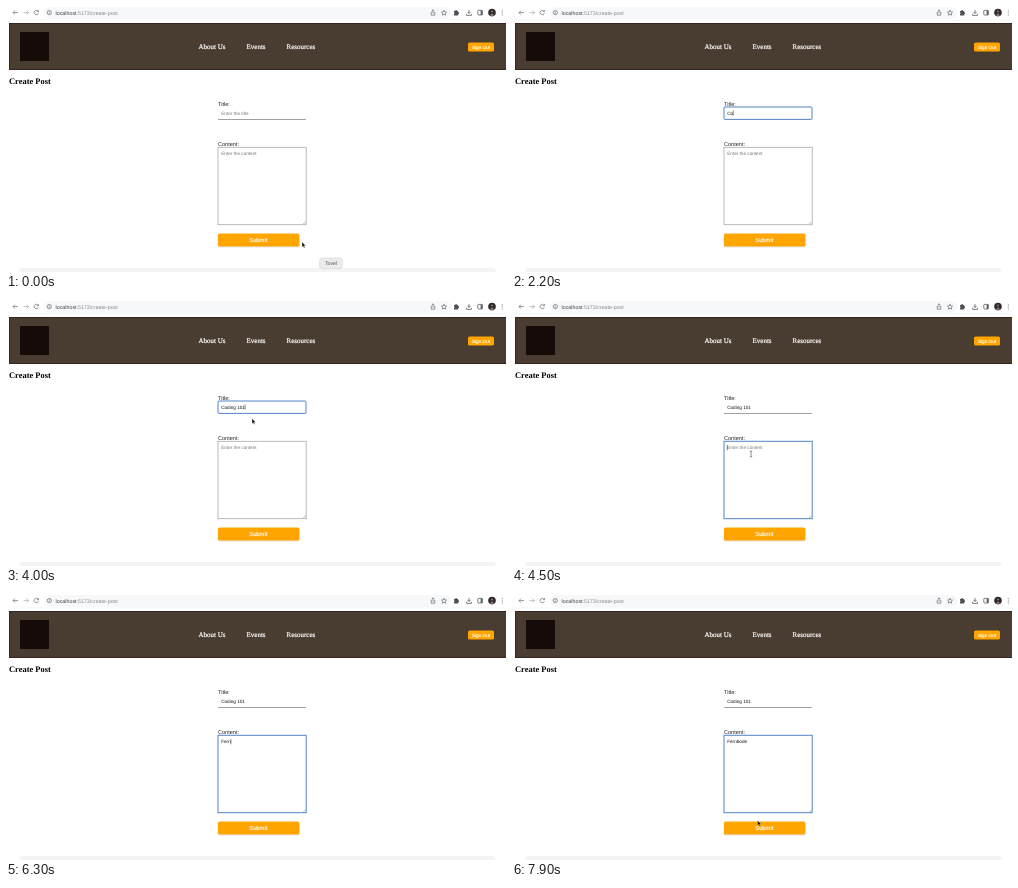
These frames come from a looping animation (500x266 px, 8000 ms). An HTML page:

```html
<!DOCTYPE html>
<html lang="en">
<head>
<meta charset="utf-8">
<title>Create Post</title>
<style>
  html, body { margin: 0; width: 100%; height: 100%; overflow: hidden; background: #fff; }
  svg { display: block; width: 500px; height: 266px; }
  text { font-family: "Liberation Sans", Arial, sans-serif; text-rendering: geometricPrecision; white-space: pre; }
  .serif { font-family: "Liberation Serif", Times, serif; }
  .nav { font-size: 7px; fill: #fff; stroke: #fff; stroke-width: .2; }
  .label { font-size: 5.55px; fill: #222; }
  .value { font-size: 4.65px; }
  .icon { fill: none; stroke: #73777b; stroke-width: .75; }
  .button { fill: #ffa500; }
  .caption { fill: #fff; stroke: #fff; stroke-width: .15; text-anchor: middle; }
</style>
</head>
<body>
<svg viewBox="0 0 500 266">
  <g id="toolbar">
    <rect x="38" y="1" width="407" height="12" rx="6" fill="#f7f8f9"/>
    <path class="icon" d="M12 6.6H7M9 4.6L7 6.6L9 8.6"/>
    <path class="icon" stroke-opacity=".6" d="M17.5 6.6H22.5M20.5 4.6L22.5 6.6L20.5 8.6"/>
    <path class="icon" d="M32 5.2A2.2 2.2 0 1 0 32.4 7.2M32.5 4V5.6H30.9"/>
    <g class="icon">
      <circle cx="43.3" cy="6.6" r="2.1"/><path d="M43.3 6.3V7.9M43.3 5.1V5.7"/>
      <path d="M425.8 6H425.2V9.2H428.8V6H428.2M427 7.6V3.8M425.9 4.9L427 3.8L428.1 4.9"/>
      <path d="M438 4.2L438.8 6L440.6 6.1L439.2 7.3L439.7 9.2L438 8.2L436.3 9.2L436.8 7.3L435.4 6.1L437.2 6Z"/>
    </g>
    <g class="icon" style="stroke: #55595d">
      <path d="M463 3.9V7.4M461.4 5.9L463 7.5L464.6 5.9M460.6 7.8V9.4H465.4V7.8"/>
      <rect x="471.8" y="4.4" width="4.6" height="4.6" rx=".6"/>
    </g>
    <path d="M448 5H449.2A.9.9 0 0 1 451 5H452.2V6.3A.9.9 0 0 1 452.2 8.1V9.4H448V7.9A.8.8 0 0 0 448 6.4Z" fill="#4d5156"/>
    <path d="M474.6 4.4H476.4V9H474.6Z" fill="#5f6368"/>
    <circle cx="486" cy="6.6" r="3.8" fill="#302a2c"/>
    <circle cx="486" cy="5.6" r="1" fill="#8b756e"/>
    <path d="M484 9.2Q486 5.6 488 9.2Q486 10.8 484 9.2" fill="#8b756e"/>
    <path d="M496.3 4.2V9.6" stroke="#73777b" stroke-width=".9" stroke-dasharray="1.1"/>
    <text x="49.6" y="8.5" font-size="5.3" fill="#3c4043">localhost<tspan fill="#85898d">:5173/create-post</tspan></text>
    <path d="M0 14H500" stroke="#f0f0f0" stroke-width=".6"/>
  </g>

  <rect x="3.5" y="17.5" width="498" height="46" fill="#493c30" stroke="#38241f"/>
  <rect x="14" y="26" width="29" height="29" fill="#150c0a"/>
  <text class="serif nav" x="192.5" y="43">About Us</text>
  <text class="serif nav" x="240.5" y="43">Events</text>
  <text class="serif nav" x="280.5" y="43">Resources</text>
  <rect class="button" x="462" y="36.5" width="26" height="9" rx="1.6"/>
  <text class="caption" x="475" y="42.6" font-size="4.65">Sign Out</text>

  <text class="serif" x="3" y="78.1" font-size="8.45" font-weight="700">Create Post</text>

  <text class="label" x="212" y="99.6">Title:</text>
  <path id="titleLine" d="M212 113.5H300" stroke="#888" stroke-width=".8"/>
  <rect id="titleRing" x="212" y="101" width="88" height="12.4" rx=".8" fill="none" stroke="#5582c6"/>
  <text id="titleText" class="value" x="215.2" y="108.9"></text>

  <text class="label" x="212" y="139.6">Content:</text>
  <rect id="contentBox" x="212" y="141.3" width="88.2" height="77.4" fill="none"/>
  <path d="M297 218L299.6 215.4M298.6 218L299.6 217" stroke="#999" stroke-width=".5"/>
  <text id="contentText" class="value" x="215.2" y="149.4"></text>

  <rect x="211.6" y="228" width="82.2" height="13.6" rx="2" fill="#000" opacity=".1"/>
  <rect class="button" x="212" y="227.5" width="81.3" height="13" rx="1.6"/>
  <text class="caption" x="252.3" y="236" font-size="5.8">Submit</text>

  <rect x="13" y="262" width="477" height="12" rx="4" fill="#f4f4f4"/>
  <g id="tooltip">
    <rect x="313.7" y="252" width="22.6" height="10.6" rx="2.6" fill="#ececec" stroke="#d2d2d2" stroke-width=".6"/>
    <text x="325" y="259.1" font-size="5.2" fill="#555" text-anchor="middle">Tovel</text>
  </g>

  <path id="caret" stroke="#333" stroke-width=".6"/>
  <path id="arrow" d="M0 0V5.2L1.2 4.1L2 6L2.9 5.6L2.1 3.8H3.7Z" fill="#111" stroke="#fff" stroke-width=".3"/>
  <path id="beam" d="M-1.2 -3Q0 -3 0 -2.2Q0 -3 1.2 -3M0 -2.2V2.2M-1.2 3Q0 3 0 2.2Q0 3 1.2 3" fill="none" stroke="#444" stroke-width=".6"/>
</svg>
<script>
const LOOP = 8000;
const $ = id => document.getElementById(id);
const show = (id, on) => $(id).setAttribute("visibility", on ? "visible" : "hidden");

// Each field: the click that focuses it, then the time of every keystroke.
const fields = [
  { id: "titleText", y: 107, hint: "Enter the title", text: "Coding 101", focus: 650, blur: 4400,
    keys: [1900, 2100, 2280, 2350, 3000, 3150, 3300, 3450, 3600, 3750] },
  { id: "contentText", y: 147.7, hint: "Enter the content", text: "Fernbode", focus: 4400, blur: LOOP,
    keys: [5650, 6050, 6150, 6280, 6450, 7000, 7100, 7300] }
];

// Pointer strokes: the pointer is hidden between them while typing.
const strokes = [
  [[0, 296, 236], [100, 296, 236], [600, 246, 111], [1900, 246, 111]],
  [[3900, 246, 112], [4000, 246, 118.5], [4300, 239, 154], [5500, 239, 154]],
  [[7400, 239, 154], [7500, 239, 156], [7850, 245.5, 226.5], [LOOP, 245.5, 226.5]]
];

function pointerAt(t) {
  const path = strokes.find(s => t >= s[0][0] && t < s[s.length - 1][0]);
  if (!path) return null;
  const i = path.findIndex(p => p[0] > t);
  const [t0, x0, y0] = path[i - 1], [t1, x1, y1] = path[i];
  const u = (t - t0) / (t1 - t0), k = u * u * (3 - 2 * u);
  return [x0 + (x1 - x0) * k, y0 + (y1 - y0) * k];
}

function drawField({ id, y, hint, text, focus, blur, keys }, t) {
  const pressed = keys.filter(k => k <= t);
  const typed = text.slice(0, pressed.length);
  const el = $(id);
  el.textContent = typed || hint;
  el.setAttribute("fill", typed ? "#111" : "#777");
  if (t < focus || t >= blur) return false;
  const x = 215.3 + (typed ? el.getComputedTextLength() : 0);
  $("caret").setAttribute("d", `M${x} ${y - 2.6}v5.2`);
  const age = t - (pressed.length ? pressed[pressed.length - 1] : focus);
  show("caret", (age + 150) % 1000 < 500);
  return true;
}

function drawPointer(t) {
  const p = pointerAt(t);
  const overField = p && p[0] > 212 && p[0] < 300 &&
    ((p[1] > 100 && p[1] < 114) || (p[1] > 141 && p[1] < 219));
  show("arrow", p && !overField);
  show("beam", overField);
  if (p) for (const id of ["arrow", "beam"]) $(id).setAttribute("transform", `translate(${p})`);
}

function draw(now) {
  const t = now % LOOP;
  show("caret", false);
  const [onTitle, onContent] = fields.map(f => drawField(f, t));
  show("titleRing", onTitle);
  show("titleLine", !onTitle);
  $("contentBox").setAttribute("stroke", onContent ? "#5582c6" : "#aaa");
  $("contentBox").setAttribute("stroke-width", onContent ? 1 : .8);
  $("tooltip").setAttribute("opacity", Math.max(0, Math.min(1, (300 - t) / 200)));
  drawPointer(t);
}

const start = performance.now();
(function tick() {
  draw(performance.now() - start);
  requestAnimationFrame(tick);
})();
</script>
</body>
</html>
```
